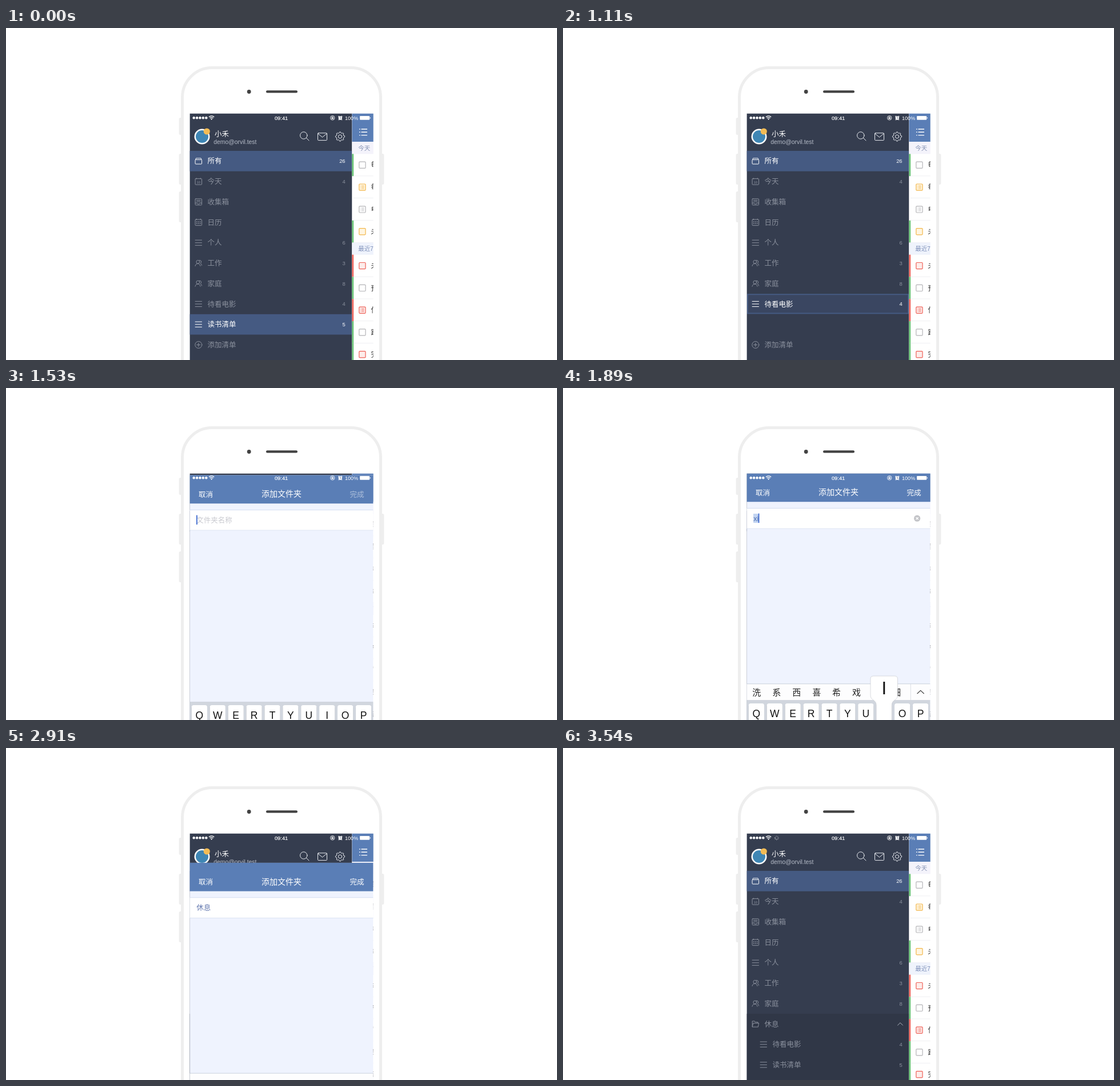
These frames come from a looping animation (964x581 px, 3.57 s). An HTML page:

```html
<!DOCTYPE html>
<html lang="zh-CN">
<head>
<meta charset="utf-8">
<title>添加文件夹</title>
<style>
html, body { margin: 0; width: 100%; height: 100%; overflow: hidden; background: #fff; }
svg { display: block; width: 100vw; height: 100vh; }
text { font-family: "Liberation Sans", "Noto Sans CJK SC", "Noto Sans CJK", sans-serif; font-weight: 300; white-space: pre; }
.ic { fill: none; stroke: currentColor; stroke-width: 1; stroke-linecap: round; stroke-linejoin: round; }
</style>
</head>
<body>
<svg id="stage" viewBox="0 0 964 581" xmlns="http://www.w3.org/2000/svg"></svg>
<script>
const LOOP = 3570, ROW = 35.73, TOP = 215, TRAVEL = 431.5;
const DIM = '#8a909d', MENU = '#353d4f', PICK = '#455a82', BLUE = '#5a7eb6';

const rect = (x, y, w, h, fill, extra = '') =>
  `<rect x="${x}" y="${y}" width="${w}" height="${h}" fill="${fill}" ${extra}/>`;
const disc = (x, y, r, fill, extra = '') => `<circle cx="${x}" cy="${y}" r="${r}" fill="${fill}" ${extra}/>`;
const text = (s, x, cy, size, fill, extra = '') =>
  `<text x="${x}" y="${cy + size * 0.37}" font-size="${size}" fill="${fill}" ${extra}>${s}</text>`;
const path = (d, extra = '') => `<path d="${d}" ${extra}/>`;
const group = (id, body, extra = '') => `<g id="${id}" ${extra}>${body}</g>`;
const MID = 'text-anchor="middle"', END = 'text-anchor="end"';
const rowY = k => TOP + ROW * (k + 0.5);

// Menu glyphs, drawn around 0,0
const box = (w, h, y = 0) => rect(-w / 2, y - h / 2, w, h, 'none', 'rx="1"');
const ICONS = {
  all: box(11.5, 7.6, 1.4) + path('M-5.2 -2.4 L-4.3 -4.9 H4.3 L5.2 -2.4'),
  today: box(11.5, 10.5, .3) + path('M-3.5 -5.8 v1.4 M3.5 -5.8 v1.4') +
    text('10', 0, .8, 6, 'currentColor', MID + ' stroke="none"'),
  inbox: box(11.5, 11) + path('M-3.3 -2.8 H3.3 M-3.3 -.4 H3.3 M-5.7 2 H-2.3 Q-2 3.8 0 3.8 Q2 3.8 2.3 2 H5.7'),
  cal: box(11.5, 10.5, .3) + path('M-3.5 -6 v1.6 M3.5 -6 v1.6') +
    [-3, 0, 3].map(x => [-1, 2].map(y => rect(x - .8, y - .6, 1.6, 1.6, 'currentColor', 'stroke="none"')).join('')).join(''),
  list: path('M-5.7 -4.6 H5.7 M-5.7 0 H5.7 M-5.7 4.6 H5.7'),
  team: disc(-1, -2.2, 2.9, 'none') + path('M-5.8 5 Q-5.3 .9 -1 .9 Q2.5 .9 3.2 5 M1.2 -5 Q4.7 -5.4 4.9 -2.5 Q4.9 -.6 3.2 .2 Q5.3 1 5.7 3.8'),
  folder: path('M-5.6 4.8 V-5 H-1.6 L-.4 -3.2 H4.2 V-1.4 M-5.6 4.8 L-4 -1.4 H5.8 L4.6 4.8 Z'),
  plus: disc(0, 0, 6, 'none') + path('M-3 0 H3 M0 -3 V3')
};

function item(icon, name, count, y, color, indent = 0) {
  return `<g class="ic" color="${color}" transform="translate(${336.8 + indent} ${y})">${ICONS[icon]}</g>` +
    text(name, 352.4 + indent, y, 12.5, color) +
    (count ? text(count, 593.6, y, 9.4, color, END) : '');
}

function gear(cx, cy) {
  let d = '';
  for (let i = 0; i < 32; i++) {
    const a = (i - .5) / 32 * 2 * Math.PI, r = i % 4 < 2 ? 8.1 : 6.4;
    d += `${i ? 'L' : 'M'}${(cx + r * Math.cos(a)).toFixed(2)} ${(cy + r * Math.sin(a)).toFixed(2)}`;
  }
  return path(d + 'Z') + disc(cx, cy, 3.1, 'none');
}

function menu() {
  const items = [['all', '所有', 26], ['today', '今天', 4], ['inbox', '收集箱'], ['cal', '日历'],
    ['list', '个人', 6], ['team', '工作', 3], ['team', '家庭', 8]];
  const top = items.map(([i, n, c], k) => item(i, n, c, rowY(k), k ? DIM : '#fff')).join('');
  const y7 = rowY(7);
  return rect(321.5, 149.5, 284, 432, MENU) +
    disc(343, 190, 13.5, '#fff') + disc(343, 190, 11, '#3f86b4') + disc(351.3, 181, 5.6, '#f3bc55') +
    text('小禾', 365, 185.5, 12.5, '#fff') +
    text('demo@orvil.test', 363.2, 199.3, 10.4, '#b4bac6') +
    `<g class="ic" color="#e8ebf0" stroke-width="1.2">${disc(520.8, 188, 6.2, 'none')}${path('M525.4 192.4 L530 197')}
      ${rect(545.5, 183.8, 16, 12.8, 'none', 'rx="1.2"')}${path('M546 185 L553.5 191.2 L561 185')}${gear(584.5, 190)}</g>` +
    rect(321.5, TOP, 284, ROW, PICK) + top +
    group('before',
      group('plain', item('list', '待看电影', 4, y7, DIM)) +
      group('target', rect(323, 466.2, 281, 33.2, '#3a4661', 'stroke="#455a82" stroke-width="2"') +
        item('list', '待看电影', 4, y7, '#fff')) +
      item('plus', '添加清单', '', rowY(9), DIM) +
      group('drag', rect(321.5, -ROW / 2, 284, ROW, PICK) + item('list', '读书清单', 5, 0, '#fff'))) +
    group('after',
      rect(321.5, TOP + ROW * 7, 284, 120, '#303747') +
      item('folder', '休息', '', y7, DIM) +
      path(`M585.6 ${y7 + 2.2} l4.4 -4.4 l4.4 4.4`, 'class="ic" color="#b0b5bf"') +
      item('list', '待看电影', 4, rowY(8), DIM, 14) +
      item('list', '读书清单', 5, rowY(9), DIM, 14));
}

function tasks() {
  const GREEN = '#62c06f', RED = '#ee5f56', AMBER = '#f2b64a', GRAY = '#b3b3b6';
  const row = (y, bar, color, lines, ch) => {
    const c = y + 19.4;
    const tint = color === GRAY ? '#fff' : color === RED ? '#fdecea' : '#fff5e0';
    return (bar ? rect(605.5, y, 2.6, 38.8, bar) : '') + rect(608, y + 38.2, 35, .6, '#e4e6ec') +
      rect(617.8, c - 5.6, 11.2, 11.2, tint, `rx="1.2" stroke="${color}" stroke-width="1.2"`) +
      (lines ? path(`M620.4 ${c - 2.4} h1 m1 0 h4 M620.4 ${c} h1 m1 0 h4 M620.4 ${c + 2.4} h1 m1 0 h4`,
        `stroke="${color}" stroke-width=".9"`) : '') +
      text(ch, 638.6, c, 12.5, '#333');
  };
  const first = [[GREEN, GRAY, 0, '每'], [0, AMBER, 1, '每'], [0, GRAY, 1, '电'], [GREEN, AMBER, 0, '未']];
  const later = [[RED, RED, 0, '未'], [GREEN, GRAY, 0, '预'], [RED, RED, 1, '信'], [GREEN, GRAY, 0, '跑'], [GREEN, RED, 0, '完']];
  const rows = (list, y) => list.map((r, i) => row(y + i * 38.8, ...r)).join('');
  return rect(605.5, 149.5, 38, 432, '#fff') + rect(605.5, 149.5, 38, 49.7, BLUE) +
    path('M618 177 h1.6 M618 182.3 h1.6 M618 187.6 h1.6 M621.5 177 H632 M621.5 182.3 H632 M621.5 187.6 H632',
      'stroke="#fff" stroke-width="1.4"') +
    rect(605.5, 199.2, 38, 21.3, '#f4f3fb') + text('今天', 616.3, 209.8, 10.4, '#8390b3') + rows(first, 220.4) +
    rect(605.5, 375.6, 38, 21.2, '#eff3fc') + text('最近7天', 616.3, 386, 10.4, '#7f91ba') + rows(later, 396.7);
}

function keyboard() {
  const keys = [...'QWERTYUIOP'].map((c, i) => {
    const x = 338.4 + i * 31.9;
    return rect(x - 13.6, 553, 27.2, 38, '#8b8f97', 'rx="3.6"') + rect(x - 13.6, 552, 27.2, 38, '#fff', 'rx="3.6"') +
      text(c, x, 569.6, 17.5, '#111', MID);
  }).join('');
  const slots = Array.from({ length: 8 }, (_, i) => text('', 338.8 + i * 34.95, 532, 15, '#222', MID)).join('');
  return rect(321.5, 546, 321, 300, '#d1d6de') + keys +
    group('bar', rect(321.5, 518, 321, 28, '#fdfdfe') + rect(321.5, 517.3, 321, .9, '#c6cfda') +
      group('words', slots) +
      group('more', rect(607.8, 518, .8, 28, '#d3d7dd') + path('M619.6 535 l6 -5.6 l6 5.6', 'fill="none" stroke="#444" stroke-width="1.2"'))) +
    group('pop', path('M-18.5 504 H18.5 Q23.7 504 23.7 509 V538 C23.7 547 13.6 545 13.6 555 V600 H-13.6 V555 C-13.6 545 -23.7 547 -23.7 538 V509 Q-23.7 504 -18.5 504 Z',
      'fill="#fff" stroke="#c9ccd2" stroke-width=".7"') + text('I', 0, 525, 31, '#111', MID + ' id="popKey"'));
}

function sheet() {
  return rect(321.5, 149.5, 321, 432, '#eff3fe') + rect(321.5, 149.5, 321, 49.7, BLUE) +
    text('取消', 337, 183, 12.5, '#fff') + text('添加文件夹', 482, 182, 14, '#fff', MID) +
    text('完成', 601.4, 183, 12.5, '#fff', 'id="done"') +
    rect(321.5, 210.2, 321, 36, '#fff') + rect(321.5, 210, 321, .8, '#ccd7ee') + rect(321.5, 245.6, 321, .8, '#d5def0') +
    text('文件夹名称', 333.2, 228, 12.5, '#c9cad0', 'id="hint"') +
    rect(333, 220, 0, 16, '#c3d5f2', 'id="mark"') + text('', 333.2, 228, 12.5, '#6479b0', 'id="field"') +
    rect(333, 219.6, 1.8, 16.4, '#3f6bd0', 'id="caret"') +
    group('clear', disc(619.6, 228.2, 5.6, '#c3c4c8') + path('M617.5 226.1 l4.2 4.2 m0 -4.2 l-4.2 4.2', 'stroke="#fff" stroke-width="1.3"')) +
    keyboard();
}

function status() {
  let dots = '', ticks = '';
  for (let i = 0; i < 5; i++) dots += disc(328.7 + i * 5.4, 157.3, 2.2, '#fff');
  for (let i = 0; i < 8; i++) ticks += `<path d="M0 -1.9 V-3.9" transform="rotate(${i * 45})" stroke="#fff" stroke-width=".9" opacity="${.4 + i * .07}"/>`;
  return dots +
    path('M355 155.8 Q359.6 152 364.2 155.8 M356.7 157.8 Q359.6 155.4 362.5 157.8', 'fill="none" stroke="#fff" stroke-width="1.3"') +
    path('M358 159 Q359.6 158 361.2 159 L359.6 161 Z', 'fill="#fff"') +
    group('spin', ticks) +
    text('09:41', 481.6, 157.6, 9.3, '#fff', MID + ' stroke="#fff" stroke-width=".2"') +
    `<g fill="none" stroke="#fff" stroke-width=".9">${disc(571.2, 157.3, 3.7, 'none')}${path('M570 157 v-1 q1.2 -1.6 2.4 0 v1')}</g>` +
    rect(569.5, 156.8, 3.4, 2.4, '#fff') +
    disc(584.8, 157.7, 3.1, '#fff') + path('M581.3 155.6 l1.8 -1.8 M588.3 155.6 l-1.8 -1.8 M582.6 160.2 l-.9 1 M587 160.2 l.9 1', 'stroke="#fff" stroke-width="1.2"') +
    path('M584.8 156 v1.9 h1.5', 'fill="none" stroke="#46546f" stroke-width=".8"') +
    text('100%', 593, 157.6, 9.1, '#fff') +
    rect(619, 154, 17.2, 6.8, '#fff', 'rx="1.2"') + rect(636.8, 156.2, 1.1, 2.4, '#fff', 'rx=".5"');
}

const stage = document.getElementById('stage');
const side = (x, y, h) => rect(x, y, 8, h, '#eeeeee', 'rx="2.5"');
stage.innerHTML = `<defs><clipPath id="glass">${rect(321.3, 149.6, 321.4, 440, '#000')}</clipPath></defs>` +
  rect(0, 0, 964, 581, '#fff') +
  side(302.6, 157, 30) + side(302.6, 220, 54) + side(302.6, 286, 54) + side(653.4, 220, 54) +
  rect(308.5, 69.5, 347, 620, '#fff', 'rx="52" stroke="#eeeeee" stroke-width="5"') +
  disc(425.2, 111.5, 3.4, '#424242') + rect(455, 109.3, 55, 4.2, '#424242', 'rx="2.1"') +
  `<g clip-path="url(#glass)">${menu()}${tasks()}${group('sheet', sheet())}${status()}</g>`;

const el = {};
stage.querySelectorAll('[id]').forEach(n => el[n.id] = n);
const show = (n, on) => n.setAttribute('display', on ? 'inline' : 'none');
const move = (n, x, y) => n.setAttribute('transform', `translate(${x} ${y})`);
const clamp = v => Math.max(0, Math.min(1, v));

// Critically damped settle from 1 to 0
const settle = ms => ms <= 0 ? 1 : (1 + .0174 * ms) * Math.exp(-.0174 * ms);

// time, field text, suggestions
const TYPED = [
  [0, '', ''],
  [1740, 'x', '下 想 小 行 些 先 像 新'],
  [1860, 'xi', '洗 系 西 喜 希 戏 吸 细'],
  [2010, 'xiu', '修 秀 休 袖 锈 羞 朽 嗅'],
  [2160, 'xiu x', '休息 修 秀 休 袖 锈 羞'],
  [2310, 'xiu xi', '休息 修习 修 秀 休 袖 锈'],
  [2520, '休息', '']
];
const POPS = [[1860, 'I', 7], [2010, 'U', 6], [2310, 'I', 7]];

function dragY(t) {
  const p = clamp((t - 30) / 600), ease = p * p * (3 - 2 * p);
  return rowY(8) + (485.4 - rowY(8)) * ease;
}

function draw(t) {
  const done = t >= 2877;
  show(el.before, !done);
  show(el.after, done);
  move(el.drag, 0, dragY(t));
  el.drag.setAttribute('opacity', 1 - clamp((t - 960) / 90));
  show(el.target, t >= 780);
  show(el.plain, t < 780);

  const shift = TRAVEL * (done ? 1 - settle(t - 2877) : settle(t - 1125));
  show(el.sheet, t > 1125 && shift < TRAVEL - .2);
  move(el.sheet, 0, shift);

  const [at, typed, words] = TYPED.filter(s => t >= s[0]).pop();
  const pinyin = /^[a-z ]+$/.test(typed);
  el.field.textContent = typed;
  el.field.setAttribute('fill', pinyin ? '#4f6fae' : '#6479b0');
  const w = typed ? el.field.getComputedTextLength() : 0;
  el.mark.setAttribute('width', pinyin ? w : 0);
  el.caret.setAttribute('x', 333 + Math.max(0, w - .4));
  show(el.caret, !done);
  show(el.hint, !typed);
  show(el.clear, typed && !done);
  el.done.setAttribute('opacity', typed ? 1 : .5);

  show(el.bar, at > 0);
  show(el.more, pinyin);
  const list = words ? words.split(' ') : [];
  let x = 338.8;
  [...el.words.children].forEach((n, i) => {
    const s = list[i] || '';
    n.textContent = s;
    x += Math.max(0, s.length - 1) * 7.5;
    n.setAttribute('x', x);
    x += 34.95 + Math.max(0, s.length - 1) * 7.5;
  });

  const pop = POPS.find(p => t >= p[0] && t < p[0] + 90);
  show(el.pop, pop);
  if (pop) {
    el.popKey.textContent = pop[1];
    move(el.pop, 338.4 + pop[2] * 31.9, 0);
  }

  show(el.spin, t >= 3180);
  el.spin.setAttribute('transform', `translate(373.8 157.4) rotate(${Math.floor(t / 90) * 45})`);
}

const start = performance.now();
function tick() {
  draw((performance.now() - start) % LOOP);
  requestAnimationFrame(tick);
}
draw(0);
requestAnimationFrame(tick);
</script>
</body>
</html>
```
